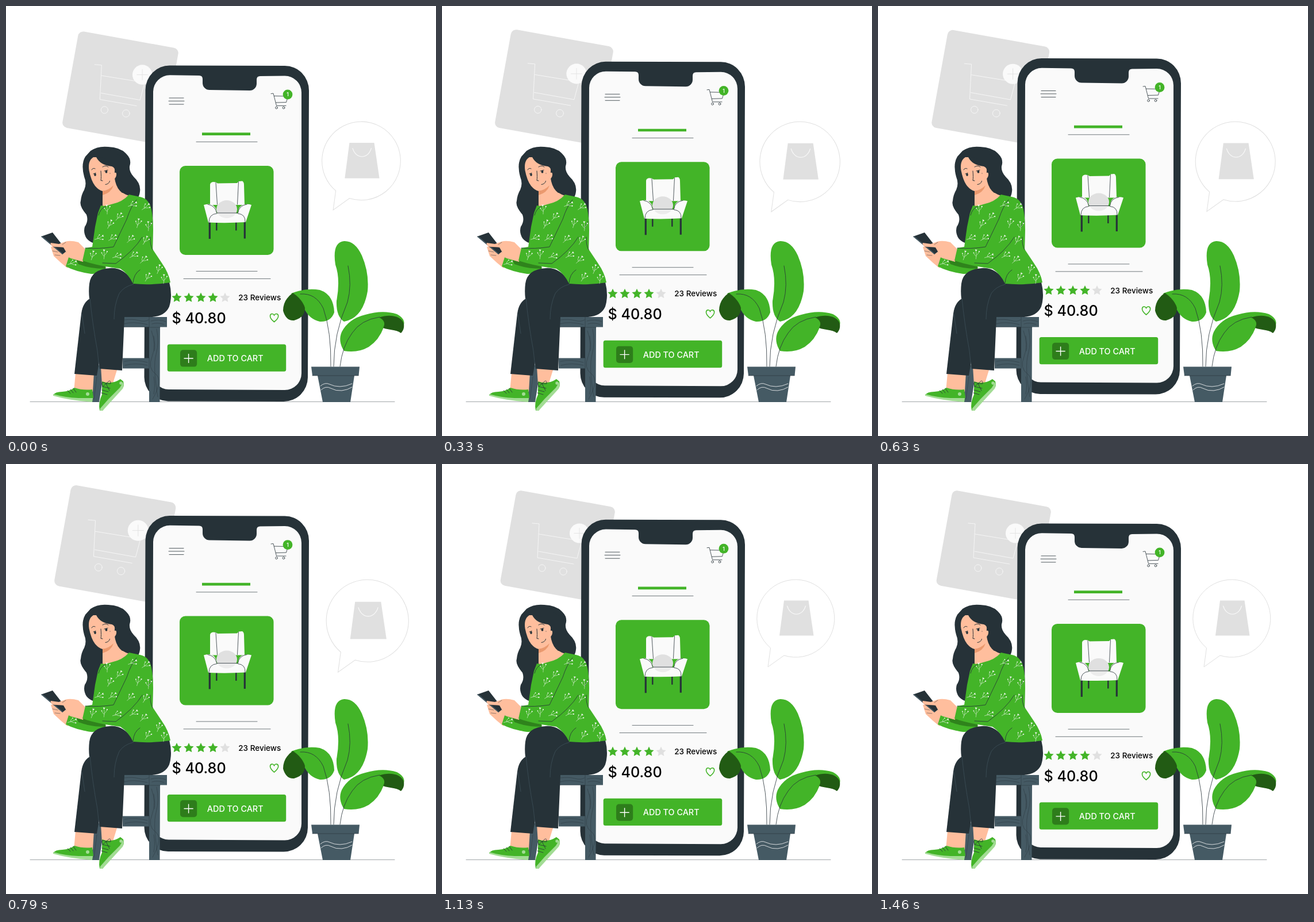
These frames come from a looping animation (748x748 px, 1.5 s). An HTML page:

```html
<!DOCTYPE html>
<html lang="en">
<head>
<meta charset="utf-8">
<title>Add to cart</title>
<style>
  html, body { margin: 0; width: 100%; height: 100%; overflow: hidden; background: #fff; }
  svg { display: block; width: 100%; height: 100%; stroke-width: .8; }
  text { font-family: Inter, sans-serif; font-weight: 450; }
  .green { fill: #43b428; }
  .deep { fill: #225b14; }
  .mint { fill: #a2dc94; }
  .dark { fill: #263238; }
  .slate { fill: #455a64; }
  .grey { fill: #e0e0e0; }
  .pale { fill: #fafafa; }
  .skin { fill: #ffbe9d; }
  .ink, .chalk { fill: none; stroke: #263238; stroke-linecap: round; stroke-linejoin: round; }
  .chalk { stroke: #fafafa; }
</style>
</head>
<body>
<svg viewBox="0 0 748 748">
  <defs>
    <path id="star" d="M0-8.6 2.6-3 8.6-2.3 4.2 1.9 5.3 7.8 0 4.9-5.3 7.8-4.2 1.9-8.6-2.3-2.6-3Z"/>
    <g id="sprig">
      <path class="chalk" stroke-width=".55" d="M0 10Q1 1-1-6M.5 3Q4 0 5-4M.5 5Q-4 3-5-1"/>
      <g fill="#fafafa"><path d="M-1-5Q-4-8-2-8.5L-1-7.5.5-8.5Q2-8-1-5Z"/><circle cx="5.2" cy="-4.5" r="1.2"/><circle cx="-5.2" cy="-1.5" r="1"/></g>
    </g>
  </defs>

  <path class="ink" stroke-width=".45" d="M42 688.4H676"/>

  <g id="pulse">
    <rect class="grey" width="175" height="168" rx="9" transform="translate(130 44.8) rotate(10.2)"/>
    <g class="chalk">
      <path d="M157 103 169 104 166 163 229 174M169 122 243 134 235 164 168 152"/>
      <circle cx="174" cy="181" r="6"/><circle cx="211" cy="187" r="6.2"/>
    </g>
    <circle class="pale" cx="239" cy="120.5" r="17"/>
    <path d="M239 111V130M229.5 120.5H248.5" stroke="#e0e0e0"/>
    <path d="M571.5 320A67.5 67.5 0 1 1 595 333L567 353Z" fill="#fff" stroke="#e0e0e0" stroke-width="1"/>
    <path class="grey" d="M595 237.5H637.5L646.5 298.5H587Z"/>
    <path class="chalk" stroke-width="1.1" d="M600.5 247C606 266 627 266 632.5 247"/>
  </g>

  <g id="phone">
    <path class="dark" d="M285 103.5 485 104A42 43 0 0 1 527 147L525 646A42 42 0 0 1 483 688L282 687.5A42 42 0 0 1 240.5 645L242.5 146A42 43 0 0 1 285 103.5Z"/>
    <path class="pale" d="M285 120.3 336 121Q342 121 342 127V134A12 12 0 0 0 354 146L424 147A12 12 0 0 0 436 135V128Q436 122 442 122L485 121.5A29 29 0 0 1 514 150.500V639A29 29 0 0 1 485 668L283 667A29 29 0 0 1 254.500 638L256 149A29 29 0 0 1 285 120.3Z"/>
    <path class="ink" d="M284 160H309M283 165.300H310M284 171H309"/>
    <g class="ink">
      <path d="M461 152.5 465 152 470.5 173.5H487M466.5 156.5 490.5 157 487.5 167.5 469.5 168"/>
      <circle cx="470.5" cy="177" r="1.9"/><circle cx="483" cy="177" r="1.9"/>
    </g>
    <circle class="green" cx="490" cy="154" r="8.4"/>
    <text x="490" y="157.4" font-size="9.5" fill="#fff" text-anchor="middle">1</text>
    <path class="green" d="M341 220.3H425V225H341Z"/>
    <path class="ink" stroke-width=".65" d="M331 236.3H437M331 461.4H437M309 474.4H460"/>

    <rect class="green" x="302" y="278" width="163.5" height="155" rx="10"/>
    <g>
      <path stroke="#263238" stroke-width="3.2" d="M354.3 374V405M415.3 374V404.5"/>
      <path stroke="#263238" stroke-width="2.4" d="M366.3 374V390.5M400.3 374V390.5"/>
      <path class="pale" d="M355 311Q355 307 360 306L365 306.500 368 308.500 402 308 405 305 411 304.500Q414 306 414 311L415 346H355Z"/>
      <path class="pale" d="M344 346Q351 343.5 357 345 366 348 366.5 361H403.5Q404 348 413 345.5 421 344 427 346L417 376Q385 378 352 376.5Z"/>
      <ellipse class="grey" cx="384" cy="353.5" rx="18" ry="15.5"/>
      <path class="pale" d="M366 360H404V371H366Z" opacity=".45"/>
      <path class="ink" d="M365 307 367.5 345M404.5 306 402.5 345M351 345Q364 347 366.5 360H403.5Q405 347 419 345M353 376Q353 362 366.5 361M416 376Q417 362 403.5 361"/>
    </g>

    <g class="green"><use href="#star" x="297" y="507"/><use href="#star" x="318" y="507"/><use href="#star" x="339" y="507"/><use href="#star" x="360" y="507"/></g>
    <use class="grey" href="#star" x="381" y="507"/>
    <text x="404.3" y="512" font-size="13.5">23 Reviews</text>
    <text x="288.5" y="551.8" font-size="25.2">$ 40.80</text>
    <path d="M466.5 549.5Q459.5 544 459.5 539.5C459.5 535 464.5 534 466.5 538 468.5 534 473.7 535 473.7 539.5Q473.5 544 466.5 549.5Z" fill="none" stroke="#43b428" stroke-width="1.6"/>
    <rect class="green" x="280.7" y="588.5" width="206.5" height="47.3" rx="3.5"/>
    <rect x="303" y="598.3" width="29.2" height="29.3" rx="5" opacity=".3"/>
    <path d="M317.6 605V621M309.5 613H325.7" stroke="#fff" stroke-width="1.4"/>
    <text x="349.8" y="618.2" font-size="14.4" fill="#fff">ADD TO CART</text>
  </g>

  <g>
    <path class="slate" d="M202 541H280V558.5H268L267.5 689H249V630.5H203V612.5H249V558.5H202ZM153 625H172L162 689H149Z"/>
    <path class="ink" stroke-width=".45" d="M204 558.5H249V541M249 559H268M249 612V630M206 546Q220 544 231 547T248 546M205 553Q220 548 246 554M252 548Q266 544 278 549M254 553Q264 550 275 554M206 618Q226 614 246 620M207 625Q225 620 246 625M253 565Q262 590 254 610T260 640 255 684M262 562Q267 585 261 606T264 680M257 574Q260 590 258 600M257 645Q260 660 257 675M158 645 153 684"/>
  </g>

  <g>
    <path class="dark" d="M147 252Q160 243 178 245 200 246 210 258 219 267 215 279 214 288 222 297 235 309 233 323 231 340 213 346L171 415Q150 416 140 404 134 394 137 384 144 374 140 363 127 348 130 339 131 328 136 320 141 309 136 297 130 275 138 262Z"/>
    <path class="skin" d="M152 263Q142 269 144.500 286 148 304 155 313 162 321 168 322L168 349 190 348 214 330Q201 326 196 318L190 300Q193 282 184 279 164 277 157 263Z"/>
    <path d="M168 321.500Q178 321 187 312 183 325 168 329Z" fill="#eb996e"/>
    <path class="dark" d="M156 262Q177 263 186 276 191 283 188 294L190 305Q193 318 202 325L216 325 214 270 180 250Z"/>
    <path class="skin" d="M186 292Q190 288 192 291 193 298 187 302Z"/>
    <ellipse class="dark" cx="155" cy="293.5" rx="1.8" ry="2.4"/><ellipse class="dark" cx="174.5" cy="288.3" rx="1.9" ry="2.5"/>
    <path class="ink" stroke-width="1" d="M149 285Q151 281 155 283M168 280Q173 276 178 280M152 292 156 290.5M171 287 177 285.5M165 287Q166 298 165 303.5L168 304M173 310.5Q179 310 180.5 304.5"/>
    <circle class="dark" cx="181" cy="291" r=".6"/>

    <path class="skin" d="M78 419 83 435 96 447 107 456 114 441 99 425 88 417Z"/>
    <path class="green" d="M110 434 104 453Q121 462 148 466 163 467 174 456L165 436 126 437Z"/>
    <path d="M122 441 126 449Q146 457 172 457L176 450 160 440Z" opacity=".4" fill="#123b0a"/>
    <path class="dark" d="M61 401 81 394 106 426 98 432Z"/>
    <path class="slate" d="M61 401 63 400.300 99.500 431.300 98 432Z"/>
    <path class="skin" d="M138 423 126 411Q112 407 103 410L92 414 78 412Q76 415 82 419L100 420 104 427Q101 431 104 435L113 439 134 445Z"/>
    <path class="ink" stroke-width=".5" d="M82 419 98 420 104 428M104 411 98 415M81 426 90 428M85 433 94 434"/>

    <path class="skin" d="M121 638H153L151 671H118ZM165 627H195L186 656 167 659Z"/>
    <path class="green" d="M82 677Q85 671 98 671 111 670 119 664 134 669 150 667L152 680 150 688Z"/>
    <path class="mint" d="M82 675Q102 681 126 682L151 682 150 689Q110 686 82 678Z"/>
    <circle class="mint" cx="142" cy="675" r="3"/>
    <path class="ink" d="M107 669 112 674M112 667 117 673M117 665 122 672"/>
    <path class="green" d="M167 653Q184 659 199 649L204 653Q207 661 201 667L179 690 168 704H163Q160 690 167 676Z"/>
    <path class="mint" d="M204 654Q207 663 200 669L179 692 168 704H163L164 700 178 684 198 664Z"/>
    <circle class="mint" cx="200" cy="656" r="2.7"/>
    <path class="ink" d="M174 657Q164 650 168 662L174 657Q183 647 182 657L174 657 180 669M167 668 178 671M166 673 176 676M168 662 181 665"/>

    <path class="dark" d="M150 507Q134 513 131 535L119 640 158 643 172 560Z"/>
    <path class="dark" d="M284 480Q290 504 284 523 276 541 250 541H206L202 634 163 631 146 516Q143 499 145 483 148 458 181 456 206 454 222 482Z"/>
    <path d="M146 508Q150 550 159 600L162 628M132 535 137 570M222 484Q205 488 197 500 188 520 188 545" fill="none" stroke="#455a64" stroke-width=".6"/>

    <path class="green" d="M165 347Q173 349 183 345 203 341 214 328L233 332Q249 335 253 354 256 370 256 390L255 423 271 447Q283 464 286 481 252 486 221 483 213 466 199 457L185 455Q157 451 133 443L138 421 150 419 155 384 160 360Z"/>
    <path class="ink" d="M227 337Q217 349 210 371L187 419Q161 423 138 421M255 424Q250 415 251 402M237 402Q222 426 191 448L168 447M221 482Q222 466 233 459M173 349Q164 352 161 364M254 375 248 386"/>
    <g id="sprigs"></g>
  </g>

  <g>
    <path d="M568 630Q568 572 551 525 535 504 512 502M570 630Q570 580 580 548M580 630Q587 600 600 570" fill="none" stroke="#fff" stroke-width="4"/>
    <path class="green" d="M588 549Q574 540 575 513 582 475 573 450 567 411 588 409 607 408 619 434 632 464 629 496 621 543 588 549Z"/>
    <path class="green" d="M496 500Q521 490 546 494 570 502 571 533 565 550 546 549 528 545 519 527Z"/>
    <path class="deep" d="M499 499Q482 511 482 530 487 548 501 547 520 542 520 525 516 511 499 499Z"/>
    <path class="green" d="M588 600Q577 583 584 567 596 544 625 537 655 528 680 536 695 544 692 555L657 559Q649 581 631 593 612 604 588 600Z"/>
    <path class="deep" d="M649 542C668 535 689 540 692 553 693 560 691 565 687 569 678 562 665 564 656 560 661 552 657 545 649 542Z"/>
    <path class="ink" d="M512 501Q539 499 552 526 566 566 565 627M595 452Q602 486 594 515 570 570 570 627M650 541Q617 546 602 569 585 592 581 627"/>
    <path class="slate" d="M531 627.5H615L613.5 643H606L599 689H551L542 643H533Z"/>
    <path class="ink" stroke-width=".6" d="M533 643H613"/>
    <path class="chalk" d="M547 661Q555 654 563 658T581 662 602 657M548 668Q556 660 565 665T584 669 602 663"/>
  </g>
</svg>
<script>
  const $ = id => document.getElementById(id);
  const LOOP = 1500, FPS = 24, LEAD = 18;
  const BEATS = [[0, 0], [.1, 1], [.3, 0], [.4, 0], [.5, 1], [.6, 0], [1, 0]];

  const sprigs = [
    [176, 353], [221, 345], [244, 349], [197, 366], [181, 379], [230, 377], [248, 382], [163, 403],
    [186, 403], [217, 405], [243, 407], [151, 433], [171, 431], [194, 435], [223, 433], [240, 441],
    [247, 471], [266, 457], [275, 474], [116, 447]
  ];
  $("sprigs").innerHTML = sprigs.map(([x, y], i) =>
    `<use href="#sprig" transform="translate(${x} ${y}) rotate(${(i * 67) % 80}) scale(.9)"/>`).join("");

  function beat(p) {
    const i = BEATS.findIndex(([at]) => at > p);
    const [a, from] = BEATS[i - 1], [b, to] = BEATS[i];
    return from + (to - from) * (p - a) / (b - a);
  }

  function draw(now) {
    // The motion advances in steps of 1/24 s.
    const step = Math.floor((now % LOOP + 5) * FPS / 1000);
    const p = (step * 1000 / FPS + LEAD) % LOOP / LOOP;
    const lift = 15 * (1 - Math.abs(2 * p - 1));
    const scale = 1 + .1 * beat(p);
    $("phone").setAttribute("transform", `translate(0 ${.36 - lift})`);
    $("pulse").setAttribute("transform", `translate(392 200) scale(${scale}) translate(-392 -200)`);
    requestAnimationFrame(draw);
  }
  draw(0);
</script>
</body>
</html>
```
